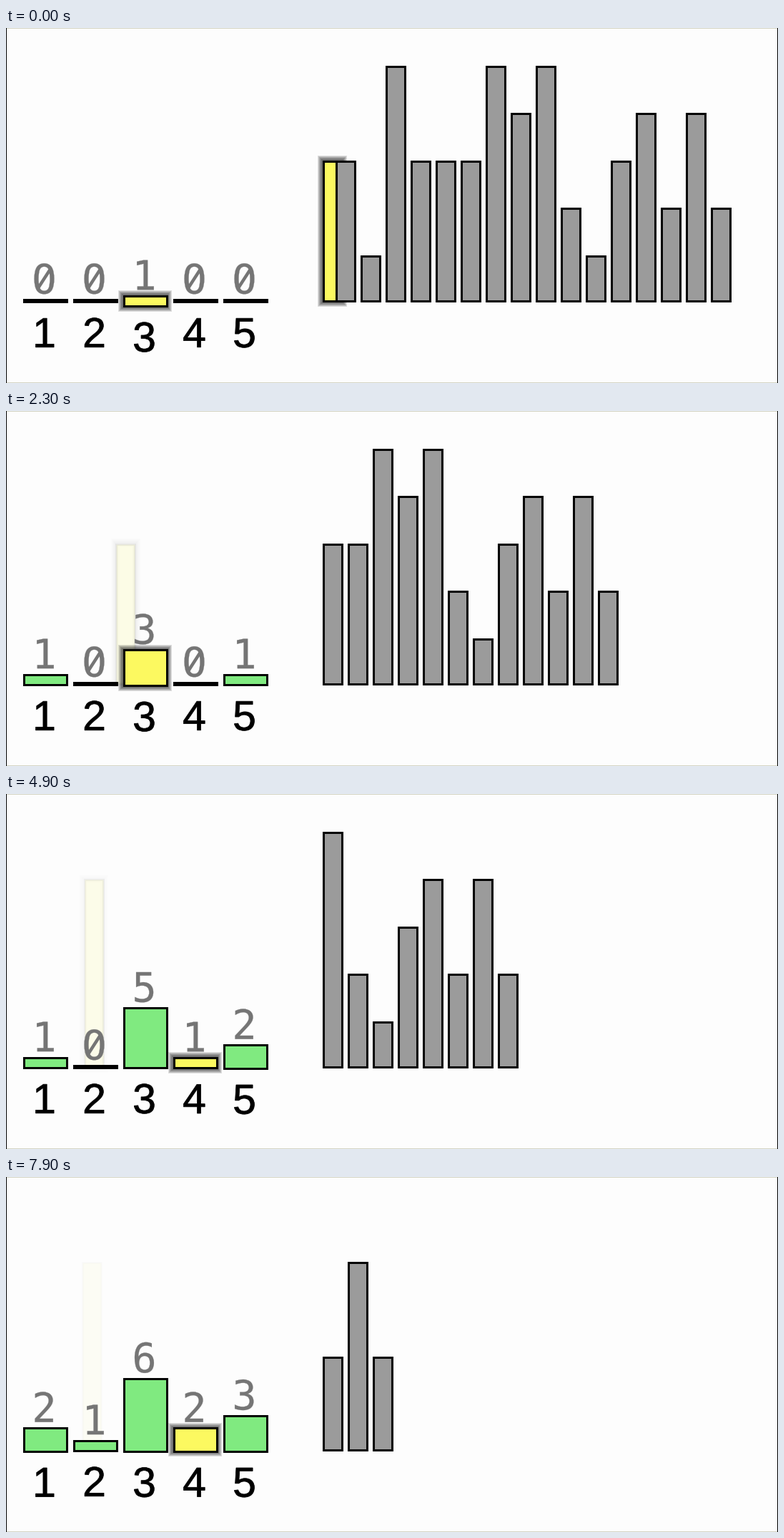
These frames come from a looping animation (1080 by 498 pixels, 8 s). A matplotlib script:

```python
import math
import matplotlib.pyplot as plt
from matplotlib.animation import FuncAnimation
from matplotlib.colors import to_rgba
from matplotlib.patches import PathPatch, Rectangle
from matplotlib.textpath import TextPath
from matplotlib.transforms import Affine2D

W, H, DPI = 1080, 498, 64
LOOP, STEP = 8000, 20
PX = 72 / DPI

BG, GRAY, DIGIT = "#fdfdfd", "#9b9b9b", "#757575"
YELLOW, GREEN = "#fcf960", "#80ea80"

VALUES = [3, 3, 1, 5, 3, 3, 3, 5, 4, 5, 2, 1, 3, 4, 2, 4, 2]
STARTS = [-4, 480, 1150, 1730, 2220, 2820, 3420, 4110, 4810, 5400,
          6000, 6600, 7100, 7720]
ENDS = [260, 940, 1520, 2010, 2590, 3190, 3890, 4580, 5180, 5770,
        6370, 6890, 7490, 8090]

QUEUE_X, PITCH, BAR_W, BAR_BASE, BAR_UNIT = 442, 35, 29, 384.5, 66.4
COL_X, COL_PITCH, COL_W, COL_BASE, COL_UNIT = 23, 70, 63, 385.5, 17.4
EXIT_X = 107
LINE = 3

fig = plt.figure(figsize=(W / DPI, H / DPI), dpi=DPI, facecolor=BG)
ax = fig.add_axes([0, 0, 1, 1])
ax.set_xlim(0, W)
ax.set_ylim(H, 0)
ax.axis("off")


def add_rect(z, **style):
    return ax.add_patch(Rectangle((0, 0), 1, 1, zorder=z, **style))


def place(rect, x, y, w, h, inset=LINE / 2):
    rect.set_bounds(x + inset, y + inset, w - 2 * inset, h - 2 * inset)


def add_box(z, fill):
    return add_rect(z, fc=fill, ec="black", lw=LINE * PX, joinstyle="miter")


class Glow:
    """Soft dark halo around a box."""

    def __init__(self, z):
        self.rings = [add_rect(z, fill=False, ec="black", lw=2 * k * PX)
                      for k in range(1, 7)]

    def show(self, bounds, alpha=1.0):
        for ring in self.rings:
            ring.set_visible(bounds is not None)
            ring.set_alpha(0.12 * alpha)
            if bounds:
                place(ring, *bounds, inset=0)


glyphs = {}


def glyph(char, family, size):
    key = char, family
    if key not in glyphs:
        glyphs[key] = TextPath((0, 0), char, size=size,
                               prop={"family": family})
    return glyphs[key]


def add_glyph(color, weight, z):
    return ax.add_patch(PathPatch(glyph("1", "Liberation Sans", 59), fc=color,
                                  ec=color, lw=weight * PX, zorder=z))


def move_glyph(patch, x, y):
    patch.set_transform(Affine2D().scale(1, -1).translate(x, y) + ax.transData)


# stage border
for x, y, w, h, color in ((0, 0, W, 1, "#d4d4c4"), (0, H - 1, W, 1, "#d4d4c4"),
                          (0, 0, 1, H, "black"), (W - 1, 0, 1, H, "black")):
    ax.add_patch(Rectangle((x, y), w, h, fc=color, lw=0, zorder=0))

bar_glow, box_glow = Glow(1), Glow(4)
lead = add_box(2, YELLOW)
queue = [add_box(3, GRAY) for _ in VALUES]
boxes = [add_box(5, GREEN) for _ in range(5)]
digits = [add_glyph(DIGIT, 0.3, 6) for _ in range(5)]
slashes = [ax.plot([], [], color=DIGIT, lw=4.5 * PX, zorder=6,
                   solid_capstyle="butt")[0] for _ in range(5)]
labels = [add_glyph("black", 0.8, 6) for _ in range(5)]


def spring(ms):
    """Underdamped step response."""
    s = max(0, ms - 28) / 1000
    w, ratio = 34, 0.609
    return 1 - math.exp(-w * ratio * s) * (math.cos(w * s) + ratio * math.sin(w * s))


def bar_bounds(x, value):
    h = value * BAR_UNIT
    return x, BAR_BASE - h, BAR_W, h


def col_top(count):
    return COL_BASE - max(2 * LINE, count * COL_UNIT)


def draw_lead(value, x, alpha):
    bounds = bar_bounds(x, value)
    place(lead, *bounds)
    lead.set_facecolor(to_rgba(YELLOW, alpha))
    lead.set_edgecolor((0, 0, 0, alpha ** 1.5))
    bar_glow.show(bounds, alpha ** 1.5)


def draw_column(i, count, drop, hot):
    x = COL_X + i * COL_PITCH
    mid = x + COL_W / 2 - 1
    top = col_top(count) + drop
    bottom = COL_BASE + drop + (0.8 if count in (2, 3, 6) else 0)
    bounds = x, top, COL_W, bottom - top
    place(boxes[i], *bounds)
    boxes[i].set_facecolor(YELLOW if hot else GREEN)
    if hot:
        box_glow.show(bounds)

    char = str(count) if count else "O"
    base = top - 7
    digits[i].set_path(glyph(char, "DejaVu Sans Mono", 57))
    move_glyph(digits[i], mid - 17.2, base)
    slashes[i].set_visible(count == 0)
    slashes[i].set_data([mid - 9, mid + 9], [base - 7, base - 35])

    labels[i].set_path(glyph(str(i + 1), "Liberation Sans", 59))
    move_glyph(labels[i], mid - 16.4, bottom + 62.3)


def draw(frame):
    t = frame * STEP
    k = max(j for j, s in enumerate(STARTS) if s <= t)
    age = t - STARTS[k]
    active = t < ENDS[k]
    left = math.exp(-(age + 11) / 24)
    done, waiting = VALUES[:k + 1], VALUES[k + 1:]

    if active:
        gone = spring(age)
        fade = max(1 - gone, math.exp(-0.22 * math.sqrt(age)))
        draw_lead(done[-1], QUEUE_X + (EXIT_X - QUEUE_X) * gone, fade)
    else:
        draw_lead(waiting[0], QUEUE_X, 1)

    for i, rect in enumerate(queue):
        rect.set_visible(i < len(waiting) and (active or i > 0))
        if i < len(waiting):
            place(rect, *bar_bounds(QUEUE_X + PITCH * (i + left), waiting[i]))

    box_glow.show(None)
    for i in range(5):
        count = done.count(i + 1)
        newest = done[-1] == i + 1
        drop = (col_top(count - 1) - col_top(count)) * left if newest else 0
        draw_column(i, count, drop, newest and active)
    return []


anim = FuncAnimation(fig, draw, frames=LOOP // STEP, interval=STEP,
                     init_func=lambda: draw(0), repeat=True, repeat_delay=0)
plt.show()
```
